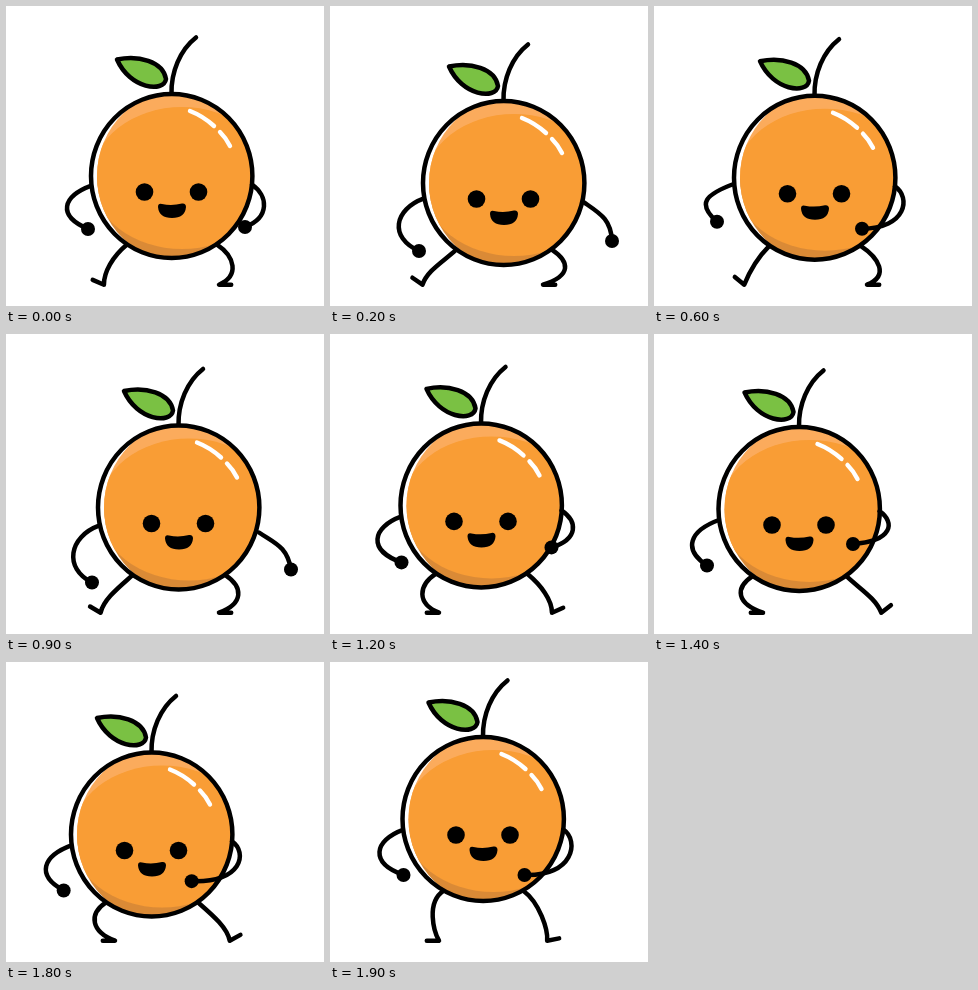
Recreate the animation shown at these times as an HTML page. Size 318 by 300 pixels, loop 2000 ms.

```html
<!DOCTYPE html>
<html lang="en">
<head>
<meta charset="utf-8">
<title>Dancing orange</title>
<style>
  html, body { margin: 0; width: 100%; height: 100%; overflow: hidden; background: #fff; }
  svg { display: block; width: 100%; height: 100%; }
  .line { fill: none; stroke: #000; stroke-width: 4.5; stroke-linecap: round; stroke-linejoin: round; }
  .shine { fill: none; stroke: #fff; stroke-width: 4.4; stroke-linecap: round; }
</style>
</head>
<body>
<svg viewBox="0 0 318 300">
  <clipPath id="skin"><ellipse rx="80.5" ry="82"/></clipPath>
  <clipPath id="shade"><circle cx="13" r="88"/></clipPath>
  <path class="line" id="leftLeg"/>
  <path class="line" id="rightLeg"/>
  <path class="line" id="leftArm"/>
  <g id="body">
    <path class="line" d="M-.5-82C-1-104 8-126 24-138.5"/>
    <path class="line" style="fill:#7ac143" d="M-55-116.5C-34-121-9-115-6-97C-8-83-42-87-55-116.5Z"/>
    <g clip-path="url(#skin)">
      <rect x="-82" y="-83" width="164" height="166" fill="#fff"/>
      <g clip-path="url(#shade)">
        <rect x="-82" y="-83" width="164" height="83" fill="#fbab5c"/>
        <rect x="-82" width="164" height="83" fill="#da8a36"/>
        <ellipse cx="10" cy="2" rx="90" ry="71" fill="#f99d35"/>
      </g>
    </g>
    <ellipse class="line" cx="-.3" rx="80.7" ry="82"/>
    <path class="shine" d="M18-65Q31-60 42-50M48-44Q54-38 58-30"/>
    <circle cx="-27.5" cy="16" r="8.8"/>
    <circle cx="26.5" cy="16" r="8.8"/>
    <path d="M-14 31Q-14 27-10 28Q0 30 10 27.5Q14 27 14 31Q13 42 0 42Q-13 42-14 31Z"/>
  </g>
  <path class="line" id="rightArm"/>
  <circle id="leftHand" r="7"/>
  <circle id="rightHand" r="7"/>
</svg>
<script>
const BEATS = 20, STEP = 100;

// Key points: [beat, x, y]
const bodyPath = [
  [0, 166, 170], [2, 174, 177], [4, 165, 167], [5, 158, 163], [6, 161, 171.7], [9, 173, 173.5],
  [11, 160, 162.5], [12, 151.5, 171.4], [16, 139.5, 178.5], [18, 146, 172.5], [19, 153.5, 157]
];
// Hands are measured outwards and down from the middle of the body.
// A fuller arm bows out more; "away" is when the foot leaves its spot, and for how long.
const sides = [
  {
    name: 'left', out: -1, fullness: 30, spot: 109, stride: 19, away: [-1, 12],
    hand: [[0, 84, 53], [2, 85, 68], [4, 97, 49], [6, 98, 44], [9, 87, 75], [12, 80, 57], [16, 105, 56], [19, 80, 56]]
  },
  {
    name: 'right', out: 1, fullness: 16, spot: 213, stride: 15, away: [11.3, 7.8],
    hand: [[0, 73, 51], [2, 108, 58], [4, 77, 59], [6, 47, 51], [9, 112, 62], [12, 70, 42], [16, 37, 28], [19, 41, 56]]
  }
];

const el = id => document.getElementById(id);
const mix = (a, b, k) => a + (b - a) * k;

function along(path, beat) {
  const i = path.findLastIndex(p => p[0] <= beat);
  const [t, x, y] = path[i];
  const [nextT, nextX, nextY] = path[i + 1] || [BEATS, ...path[0].slice(1)];
  const k = (beat - t) / (nextT - t);
  return [mix(x, nextX, k), mix(y, nextY, k)];
}

function place(id, x, y) {
  el(id).setAttribute('transform', `translate(${x} ${y})`);
}

function drawArm(side, bx, by, beat) {
  const [dx, dy] = along(side.hand, beat);
  const reach = dx - 80;
  const shoulder = 9 + (dy - 52) * 0.4 + Math.max(0, reach - 20);
  const at = (x, y) => `${bx + side.out * x} ${by + y} `;
  el(side.name + 'Arm').setAttribute('d',
    'M' + at(80, shoulder) +
    'C' + at(80 + side.fullness, shoulder + 11) +
    at(dx + side.fullness + 4 - 0.75 * reach, dy - 12 - 0.35 * reach) +
    at(dx, dy));
  place(side.name + 'Hand', bx + side.out * dx, by + dy);
}

// A foot away from its spot slides out, lifts its toe and straightens its leg.
function drawLeg(side, bx, by, beat) {
  const [from, length] = side.away;
  const swing = Math.sin(Math.PI * (beat - from) / length);
  const lift = beat > from && beat < from + length ? swing ** 0.4 : 0;
  const heelX = side.spot + side.out * side.stride * lift, heelY = 278.7;
  const hip = 45 + (by - 170) * 0.4;
  const hipX = bx + side.out * hip, hipY = by + Math.sqrt(82 ** 2 - hip ** 2);
  const bend = (5 + (by - 157) * 1.2) * (1 - lift) ** 2 - 6 * lift;
  const tilt = lift * 40 * Math.PI / 180;
  const step = (x, y, dx, dy) => `${x + side.out * dx} ${y + dy} `;
  el(side.name + 'Leg').setAttribute('d',
    'M' + step(hipX, hipY, 0, 0) +
    'C' + step(hipX, hipY, 18 - 6 * lift, 12) +
    step(heelX, heelY, bend, -9 - 6 * lift) +
    step(heelX, heelY, 0, 0) +
    'L' + step(heelX, heelY, 12.2 * Math.cos(tilt), -12.2 * Math.sin(tilt)));
}

function draw(ms) {
  const beat = Math.floor(ms / STEP) % BEATS;
  const [x, y] = along(bodyPath, beat);
  place('body', x, y);
  for (const side of sides) {
    drawArm(side, x, y, beat);
    drawLeg(side, x, y, beat);
  }
}

const start = performance.now();
function tick() {
  draw(performance.now() - start);
  requestAnimationFrame(tick);
}
tick();
</script>
</body>
</html>
```
